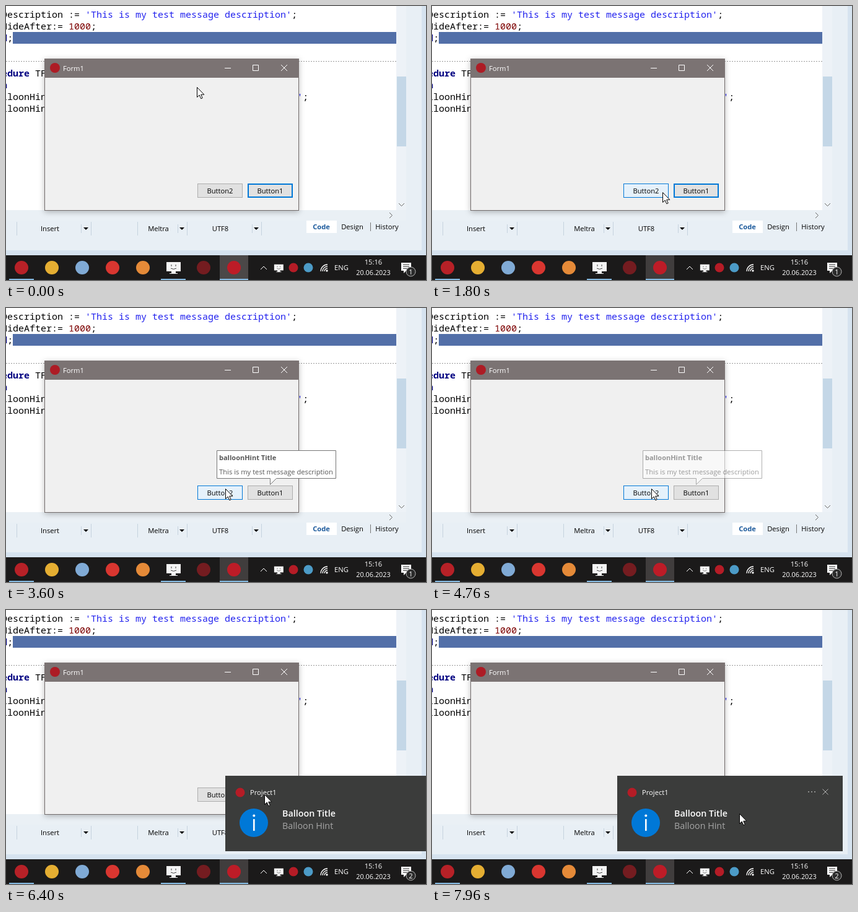
Write an HTML page that moves like this. It is 678 px wide and 443 px high and loops after 8000 ms.

```html
<!DOCTYPE html>
<html lang="en">
<head>
<meta charset="utf-8">
<title>Balloon hint demo</title>
<style>
html, body { margin: 0; width: 100%; height: 100%; overflow: hidden; background: #e8eff5; }
svg { display: block; }
text { font: 11.2px "Open Sans", "Noto Sans", sans-serif; fill: #000; white-space: pre; }
.code text { font: 15px "Noto Sans Mono", "DejaVu Sans Mono", monospace; }
.code .kw { font-weight: 700; fill: #000080; }
.code .str { fill: #2222ee; }
.code .num { fill: #7c0000; }
.mid { text-anchor: middle; }
.light text, text.light { fill: #fff; }
.line { fill: none; stroke: #fff; }
.big text { font-size: 14.3px; }
</style>
</head>
<body>
<svg width="678" height="443" viewBox="0 0 678 443">
  <defs>
    <g id="monitor">
      <path d="M-11 -8H12V7H-11ZM-3 7H4V10H-3ZM-6 10H7V11H-6Z" fill="#f4f4f4"/>
      <path d="M-3 -4V-1M4 -4V-1M-4 2Q.5 5 5 2" fill="none" stroke="#444"/>
    </g>
    <path id="drop" d="M-4 -2H4L0 2Z"/>
    <path id="chevron" class="line" d="M-5 2.5L0 -2.5 5 2.5"/>
  </defs>

  <!-- editor -->
  <rect width="678" height="443" fill="#e8eff5"/>
  <rect width="630" height="330" fill="#fff"/>
  <rect x="630" width="16" height="330" fill="#edf2f7"/>
  <rect x="631" y="114" width="15" height="113" fill="#c4d7e7"/>
  <rect y="330" width="646" height="17" fill="#eaf0f5"/>
  <rect x="671" width="7" height="403" fill="#d6e3ef"/>
  <rect y="395" width="678" height="8" fill="#d6e3ef"/>
  <path d="M634 319L638.5 323.5 643 319M619 334L623.5 338.5 619 343" fill="none" stroke="#666"/>
  <rect x="11" y="42" width="619" height="19" fill="#526fa8"/>
  <path d="M0 89.5H630" stroke="#999" stroke-dasharray="2 2"/>
  <g class="code" transform="translate(-7)">
    <text y="19">Description := <tspan class="str">'This is my test message description'</tspan>;</text>
    <text y="38">HideAfter:= <tspan class="num">1000</tspan>;</text>
    <text y="57"><tspan class="kw">d</tspan>;</text>
    <text y="114"><tspan class="kw">edure</tspan> TForm1</text>
    <text y="133" class="kw">n</text>
    <text y="152">lloonHint</text>
    <text y="171">lloonHint</text>
    <text x="477" y="152"><tspan class="str">'</tspan>;</text>
  </g>

  <!-- status bar -->
  <path d="M17.5 349V371M121.5 353V367M137.5 349V371M212.5 349V371M277.5 353V367M292.5 349V371M397.5 353V367M412.5 349V371" stroke="#c5d2de"/>
  <use href="#drop" x="129" y="360"/>
  <use href="#drop" x="284" y="360"/>
  <use href="#drop" x="404" y="360"/>
  <rect x="485" y="347" width="49" height="20" fill="#fff"/>
  <path d="M588.5 350V364" stroke="#777"/>
  <g class="mid">
    <text x="71" y="364">Insert</text>
    <text x="246" y="364">Meltra</text>
    <text x="346" y="364">UTF8</text>
    <text x="509" y="361" style="font-weight:700;fill:#1c5a9c">Code</text>
    <text x="559" y="361">Design</text>
    <text x="615" y="361">History</text>
  </g>

  <!-- form -->
  <g style="filter:drop-shadow(0 2px 5px #0004)">
    <rect x="62.5" y="85.5" width="410" height="245" fill="#f0f0f0" stroke="#726b6b"/>
    <rect x="62" y="85" width="411" height="31" fill="#7b7373"/>
  </g>
  <circle cx="79" cy="100" r="8" fill="#ad1c25"/>
  <text x="92" y="105" class="light">Form1</text>
  <path class="line" d="M353 100.5H363M398.5 95.5H407.5V104.5H398.5ZM444 95L454 105M454 95L444 105"/>
  <g id="buttons"></g>

  <g id="hint">
    <path d="M340.5 230.5H532.5V275.5H436.5L426.5 285.5V275.5H340.5Z" fill="#fff" stroke="#767676"/>
    <text x="344" y="246" style="font-weight:700;font-size:11px;fill:#575757">balloonHint Title</text>
    <text x="344" y="269" style="fill:#575757">This is my test message description</text>
  </g>

  <!-- taskbar -->
  <rect y="403" width="678" height="40" fill="#1b1a1a"/>
  <rect id="tile" x="345" y="403" width="46" height="40"/>
  <path d="M5 442H45M250 442H290M345 442H391" stroke="#83b8df" stroke-width="2"/>
  <g id="apps"></g>
  <use href="#monitor" x="270" y="422"/>
  <use href="#chevron" x="416" y="423.5"/>
  <use href="#monitor" transform="translate(440 423) scale(.65)"/>
  <circle cx="464" cy="423" r="7.5" fill="#b51c26"/>
  <circle cx="488" cy="423" r="7.5" fill="#4c9bc7"/>
  <g class="line" stroke-width="1.3" transform="translate(519 429)">
    <path d="M-11 0A11 11 0 0 1 0 -11M-8 0A8 8 0 0 1 0 -8M-5 0A5 5 0 0 1 0 -5"/>
    <circle cx="-1" cy="-1" r="1"/>
  </g>
  <g class="light mid">
    <text x="541.5" y="427">ENG</text>
    <text x="593" y="418">15:16</text>
    <text x="593" y="435" style="font-size:10.9px">20.06.2023</text>
    <path d="M638 415H654V428H646L642 432V428H638Z" fill="#fff"/>
    <path d="M641 418.5H651M641 421.5H651M641 424.5H651" stroke="#333"/>
    <circle cx="653.5" cy="429.5" r="7.5" fill="#2b2b2b" stroke="#bbb"/>
    <text id="badge" x="653.5" y="433.5"></text>
  </g>

  <g id="toast" class="light">
    <rect y="268" width="364" height="122" fill="#3b3c3b"/>
    <circle cx="24" cy="295" r="7.5" fill="#b51c26"/>
    <text x="40" y="299">Project1</text>
    <path id="dots" d="M309 294h0m5 0h0m5 0h0" stroke="#aaa" stroke-width="2" stroke-linecap="round"/>
    <path class="line" style="stroke:#b5b5b5" d="M331.5 289.5L340.5 298.5M340.5 289.5L331.5 298.5"/>
    <circle cx="46" cy="344" r="23" fill="#0078d7"/>
    <rect x="45" y="338" width="2.6" height="19" fill="#fff"/>
    <circle cx="46.3" cy="332.5" r="2" fill="#fff"/>
    <g class="big">
      <text x="92" y="334" style="font-weight:600">Balloon Title</text>
      <text x="92" y="354" style="fill:#a6a6a6">Balloon Hint</text>
    </g>
  </g>

  <g id="pointer">
    <circle id="click" r="12.5" fill="#f5e829"/>
    <path d="M.5 .5V16.5L4.2 13 6.8 18.8 9.2 17.7 6.7 12.2H11.8Z" fill="#fff" stroke="#000"/>
  </g>
</svg>
<script>
const LOOP = 8000, STEP = 40;
const CLICK2 = 2640, CLICK1 = 5800, TOAST = 6253;
const LEFT = { 1: 390, 2: 309 };
const $ = id => document.getElementById(id);

// App icons sit on an even grid; the gap holds the monitor
const apps = ['#b72127', '#e5ae32', '#80aad5', '#d93630', '#e58a38', 'none', '#741c20', '#bd1c27'];
$('apps').innerHTML = apps.map((fill, i) =>
  `<circle cx="${25 + 49 * i}" cy="423" r="11" fill="${fill}"/>`).join('');

const button = n => `<g transform="translate(${LEFT[n]} 287)">
  <rect x=".5" y=".5" width="72" height="22" fill="#e1e1e1" stroke="#adadad"/>
  <rect id="hover${n}" x=".5" y=".5" width="72" height="22" fill="#e5f1fb" stroke="#0078d7"/>
  <rect id="focus${n}" x="1" y="1" width="71" height="21" fill="none" stroke="#0078d7" stroke-width="2"/>
  <text x="36.5" y="16" class="mid">Button${n}</text></g>`;
$('buttons').innerHTML = button(2) + button(1);

const ramp = (t, start, length) => Math.min(1, Math.max(0, (t - start) / length));
const pulse = (t, start, end, fade) => ramp(t, start, fade) - ramp(t, end, fade);

// Each move: start, end, x, y reached
const moves = [
  [40, 320, 300, 189], [480, 920, 354, 315], [1040, 1320, 354, 303], [1600, 2120, 408, 297],
  [2360, 2600, 354, 292], [4760, 5400, 417, 298], [7840, 7960, 496, 329]
];
function cursor(t) {
  let x = 308, y = 131;
  for (const [start, end, toX, toY] of moves) {
    const p = ramp(t, start, end - start), eased = p * p * (3 - 2 * p);
    x += (toX - x) * eased;
    y += (toY - y) * eased;
  }
  return [Math.round(x), Math.round(y)];
}

// Hover fades by averaging the pointer's recent presence over the button
function hover(n, t) {
  let hits = 0;
  for (let k = 0; k < 5; k++) {
    const [x, y] = cursor(t - k * STEP);
    if (x >= LEFT[n] && x < LEFT[n] + 73 && y >= 287 && y < 310) hits++;
  }
  return hits / 5;
}

function draw(now) {
  const t = Math.floor(now % LOOP / STEP) * STEP;
  const show = (id, opacity) => $(id).style.opacity = opacity;
  show('hover1', hover(1, t));
  show('hover2', hover(2, t));
  show('focus1', 1 - pulse(t, CLICK2 + 40, CLICK1, 240));
  show('focus2', pulse(t, 4960, CLICK1, 240));
  show('hint', pulse(t, 3280, 4640, 280));
  show('click', .6 * (pulse(t, CLICK2 - 40, CLICK2 + 120, 80) + pulse(t, CLICK1 - 40, CLICK1 + 120, 80)));
  show('dots', +(t >= 7880));
  $('pointer').setAttribute('transform', `translate(${cursor(t)})`);
  const slide = 379 * Math.exp(-Math.max(0, t - TOAST) / 76);
  $('toast').setAttribute('transform', `translate(${299 + Math.round(slide)})`);
  $('badge').textContent = t < TOAST + 60 ? 1 : 2;
  $('tile').style.fill = t < 160 ? '#4b4848' : '#403d3d';
  requestAnimationFrame(draw);
}
requestAnimationFrame(draw);
</script>
</body>
</html>
```
